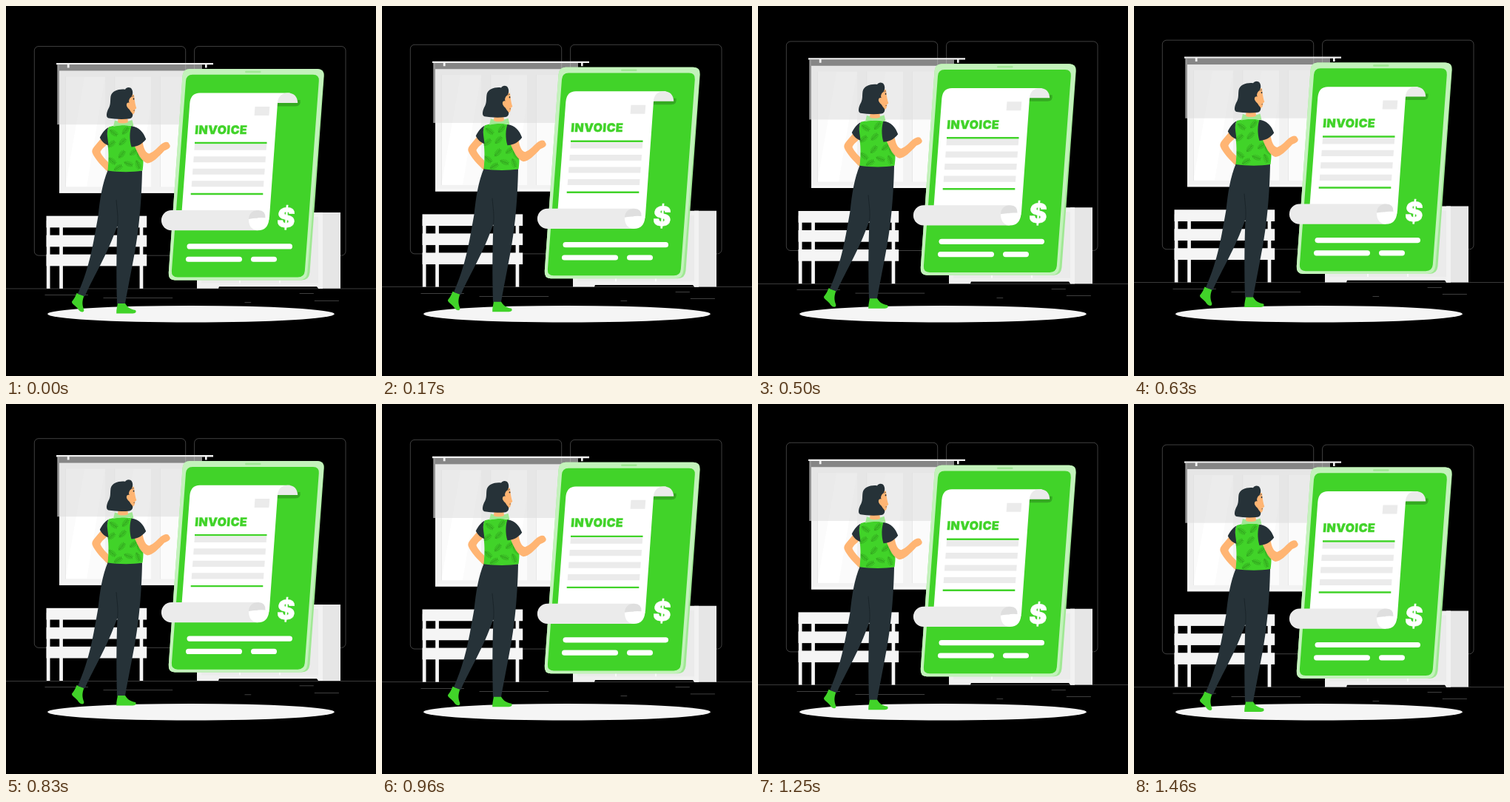
An HTML page that plays this animation: 500x500 px, repeating every 1.5 s.

```html
<!DOCTYPE html>
<html lang="en">
<head>
<meta charset="utf-8">
<title>Invoice</title>
<style>
html, body { margin: 0; width: 100%; height: 100%; overflow: hidden; background: #000; }
svg { display: block; width: 100vw; height: 100vh; }
text { font-family: Inter, Roboto, sans-serif; font-weight: 900; }
.green { fill: #41d329; }
.dark { fill: #263238; }
.skin { fill: #ffb573; }
.grey { fill: #ebebeb; }
.pale { fill: #f5f5f5; }
</style>
</head>
<body>
<svg viewBox="0 0 500 500">
<ellipse class="pale" cx="250" cy="416.24" rx="193.9" ry="11.3"/>
<g id="scene">
  <g id="floor" class="grey">
    <rect y="382.4" width="500" height=".25"/>
  </g>
  <g fill="none" stroke="#ebebeb" stroke-width=".27">
    <rect x="38.3" y="55.1" width="204.4" height="282.6" rx="5.7"/>
    <rect x="254.6" y="55.1" width="204.4" height="282.6" rx="5.7"/>
  </g>

  <g transform="translate(0 .5)">
  <g id="window">
    <rect x="72" y="87.5" width="190" height="165.2" fill="#f2f2f2"/>
    <path d="M72 249.5H262V252.7H72Z" fill="#f8f8f8"/>
    <path d="M81 95.5H134V244.3H81ZM147 95.5H196V244.3H147ZM209 95.5H252V244.3H209Z" fill="#fbfbfb"/>
    <path d="M80.5 95V244.5M146.7 95V244.5M208.5 95V244.5" stroke="#e8e8e8"/>
    <path d="M106 96H134L109 244H81V240Z M172 96H196V130L180 244H152Z" fill="#fff"/>
    <path d="M69.3 79.3H265V160.2H69.3Z" fill="#e0e0e0" opacity=".6"/>
    <path d="M69.3 79.3H72V160.2H69.3Z" fill="#fff" opacity=".12"/>
    <path d="M68 77H280V79.3H68ZM82.8 79H85.6V83.5H82.8ZM269 79H271.6V83.5H269Z" fill="#f0f0f0"/>
  </g>

  <g id="bench" class="pale"></g>

  <g id="cabinet">
    <path d="M258 279H428V381.9H422L420 379.2H288L287 381.9H258Z" fill="#f0f0f0"/>
    <path d="M264 285H422V374.5H264Z" class="grey"/>
    <path d="M316 285V374.5M370 285V374.5" stroke="#fafafa" stroke-width="2"/>
    <path d="M428 279H452V381.9H422V376Z" fill="#e6e6e6"/>
    <path d="M422 279H428V381.9H422Z" fill="#f2f2f2"/>
  </g>

  <g id="tablet">
    <path d="M248 85H421Q430.5 85 429.7 95L410.5 360Q409.500 370.500 399.500 370.500H228Q219 370.500 219.800 360L238.500 95Q239.300 85 248 85Z" fill="#a0e894"/>
    <path d="M248 85H420Q430 85 429.200 95L407.300 360Q406.300 370.500 396 370.500H228Q219 370.500 219.800 360L238.500 95Q239.300 85 248 85Z" fill="#c3f2bb"/>
    <path class="green" d="M252 92.800H415Q423.500 92.800 422.800 101.500L403.800 358Q403 366.600 394.300 366.600H232Q223.300 366.600 223.900 358L243 101.500Q243.700 92.800 252 92.800Z"/>
    <rect x="323" y="87.700" width="21.500" height="2.500" rx="1.250" fill="#a0e894"/>
  </g>

  <g id="paper">
    <path d="M366 127H397.5Q399 135.500 391 135.500H365.500Z" fill="#34a921"/>
    <path d="M262 117.600H384L367 131L356 285Q354 303 336 303L237.500 278L248.300 132Q249.500 117.600 262 117.600Z" fill="#fff"/>
    <path class="grey" d="M366.800 131Q368.500 117.600 381 117.600Q393.500 118 394.200 131Z"/>
    <path class="grey" d="M223.500 276H340V303.200H223.500A13.600 13.600 0 0 1 223.500 276Z"/>
    <path d="M327.800 287H355.500Q354.500 303.200 340.500 303.200Q328 303 327.800 287Z" fill="#fff"/>
    <path d="M327.800 288Q329 276 341 276Q351 276.500 350.500 286.300Q340 285.500 327.800 288Z" fill="#dfdfdf"/>
    <path class="grey" d="M336.500 136H356.300L355.400 148H335.600Z"/>
    <g id="rows" class="grey"></g>
    <path d="M255 185H352.500M249.700 254H347.300" stroke="#41d329" stroke-width="2.400"/>
    <text class="green" transform="translate(255 172.600) skewX(-4)" font-size="16" letter-spacing=".45" stroke="#41d329" stroke-width=".35">INVOICE</text>
    <text transform="translate(365.600 299.200) skewX(-4)" font-size="36.500" fill="#fff" stroke="#fff" stroke-width=".5">$</text>
    <g fill="#fff">
      <rect x="244.500" y="321.400" width="142.500" height="7.200" rx="3.600"/>
      <rect x="243" y="338.700" width="76" height="7.200" rx="3.600"/>
      <rect x="331" y="338.700" width="35" height="7.200" rx="3.600"/>
    </g>
  </g>

  <g id="woman">
    <path class="skin" d="M129 178C123 187 115 192 116.500 198C120 207 130 217 137 223.500L140 222L138 211C133 206 128 200 127.500 197C130 192 135 189 139 185Z"/>
    <path class="green" d="M95.500 388L105.500 391.500C103 398 102.500 403 105.300 410.500C106 414.500 101 414.500 98 410.500C95 405 88.500 403 89 399.500C92 396 94 392 95.500 388ZM151 400.500H160.500C163 406.500 168 410 175 411C177 414.500 174 415.500 170 415.500H149.200C149 410 150.500 406 151 400.500Z"/>
    <path class="dark" d="M138 221L184 222.500C183.500 250 181.500 290 174.500 330C169 360 165 380 161 402H150C149 370 149 335 150.500 297C136 338 120 362 106.500 392.500L97 389C114 350 118 320 124.500 284C127 260 130 240 138 221Z"/>
    <path d="M149 262C150 275 152 285 150.500 298" fill="none" stroke="#172126" stroke-width=".8"/>
    <clipPath id="cut"><path id="shape" d="M139 163.500C150 160.500 160 160.500 171 162.500C178 172 182 184 183.500 195C186 203 186 213 184.500 222.500C170 225 151 224.500 137.500 222.500C139 208 139 193 136.500 183C136.500 175 136 169 139 163.500Z"/></clipPath>
    <use href="#shape" class="green"/>
    <g id="leaves" clip-path="url(#cut)" opacity=".7"></g>
    <path class="skin" d="M173 187L184.500 183C186 193 189 199 193.500 199.500C200 197 206 190 209.500 187C213 184 219 182 220.500 186.500C223.500 190 221 193 214 195.500C206 204 198 212.500 191 212.500C183 210 178 200 173 187Z"/>
    <path class="dark" d="M138.500 164C133 167 129 173 126.800 178C130 184 134 187 138.500 188.500C138 180 135 172 138.500 164ZM169.500 162.300C180 163.500 186 171 189.200 180C184 187 176 190.500 169.500 190.500C166.500 181 167 169 169.500 162.300Z"/>
    <path d="M147 154.500C153 157 164 157 170.500 154L172.500 162.300C163 160.500 153 161 145 163Z" fill="#a0e894"/>
    <path class="skin" d="M152 148H164L165 157C161 159 154 159 151 157Z"/>
    <path class="skin" d="M161 122L172.800 119.500C174 126 173.800 131 176.300 138C175.800 139.300 174.300 139 174.300 140C174.500 145 172 148.500 165 147L160 140Z"/>
    <path class="dark" d="M161 112.700C163 109.300 168 109.300 170 112.500C172.500 117 171 122.500 167.500 124.500C165.500 128 166 130 167 131C163.500 129.500 162 133 163.500 136C164.500 138.500 166.500 139 167.500 141C169 144 171.500 145 171.300 147.500C171 150 169.500 152 167 152.300C158 153.500 147 153 138.500 151.500C134.500 150 136 144 138 139.500C142 133 140.500 129 141.500 122C143 114 154 111.500 161 112.700Z"/>
    <path class="dark" d="M171.700 125.500a.8 1.200 0 1 0 1.600 0a.8 1.200 0 1 0-1.600 0Z"/>
    <path d="M170 123C171 121.800 172 121.500 173 122M172.300 141.500L174 141" fill="none" stroke="#263238" stroke-width=".6"/>
  </g>
  </g>
</g>
</svg>
<script>
const $ = id => document.getElementById(id);
const LOOP = 1500, RISE = 10, LEAD = 40;

const rect = (x, y, w, h) => `<rect x="${x}" y="${y}" width="${w}" height="${h}"/>`;
const add = (id, html) => $(id).insertAdjacentHTML("beforeend", html);

add("floor", [
  [416.8, 398.5, 33.1], [322.5, 401.2, 8.7], [396.6, 389.2, 19.2],
  [52.5, 390.9, 43.2], [104.6, 390.9, 6.3], [131.5, 395.1, 93.7]
].map(([x, y, w]) => rect(x, y, w, 0.27)).join(""));

add("bench",
  [0, 1, 2].map(i => rect(54.5, 283.7 + 26 * i, 135.7, 15.7)).join("") +
  [54.8, 72.2, 180.6].map(x => rect(x, 290, 4.7, 91.9)).join(""));

add("rows", [0, 1, 2, 3].map(i => {
  const x = 255 - 1.25 * i, y = 186.7 + 16.5 * i;
  return `<path d="M${x} ${y}H${x + 97.3}L${x + 96.7} ${y + 8.2}H${x - 0.6}Z"/>`;
}).join(""));

// Each leaf is a fan of short ribs along a stem
const leaf = (x, y, turn) => {
  let ribs = "M-6 0H6";
  for (let k = -5; k <= 5; k += 2) {
    const r = 3.5 * Math.sqrt(1 - k * k / 40);
    ribs += `M${k} 0L${k + 1.5} ${r}M${k} 0L${k + 1.5} ${-r}`;
  }
  return `<path transform="translate(${x} ${y}) rotate(${turn})" d="${ribs}" stroke="#2b8a1b" stroke-width=".7"/>`;
};
add("leaves", [
  [145, 171, 35], [161, 169, -50], [142, 187, -40], [157, 184, -45],
  [172, 198, -35], [156, 201, -50], [143, 209, 40], [165, 213, 20],
  [178, 214, 70], [151, 219, -30], [181, 203, 50]
].map(a => leaf(...a)).join(""));

function draw(t) {
  const p = ((t + LEAD) % LOOP) / LOOP;
  const y = -RISE * (1 - Math.abs(1 - 2 * p));
  $("scene").setAttribute("transform", `translate(0 ${y.toFixed(3)})`);
}

let start;
function tick(now) {
  start ??= now;
  draw(now - start);
  requestAnimationFrame(tick);
}
draw(0);
requestAnimationFrame(tick);
</script>
</body>
</html>
```
